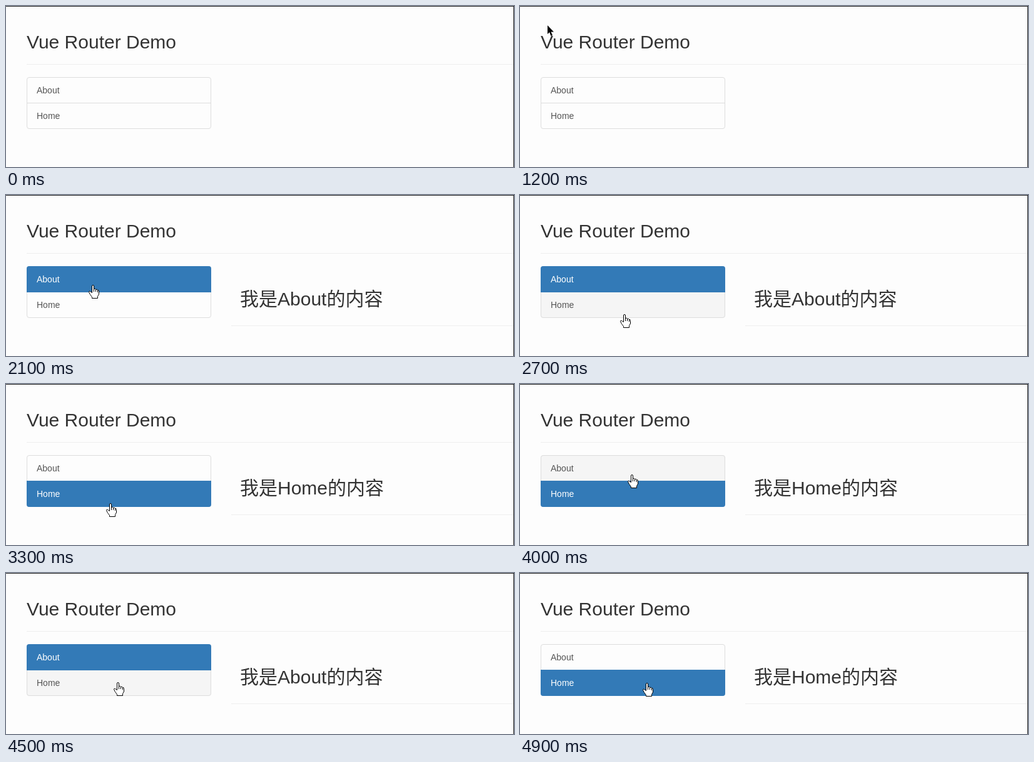
Animation of 812 by 258 pixels, one loop 5000 ms. Source, as an HTML page with a canvas:

```html
<!DOCTYPE html>
<html lang="zh-CN">
<head>
<meta charset="utf-8">
<title>Vue Router Demo</title>
<style>
  html, body { margin: 0; width: 100%; height: 100%; overflow: hidden; background: #fdfdfd; }
  canvas { display: block; }
</style>
</head>
<body>
<canvas id="stage" width="812" height="258"></canvas>
<script>
const ctx = document.getElementById('stage').getContext('2d');
const LOOP = 5000;
const STEP = 100;
const FAMILY = '"Liberation Sans", Arial, "Noto Sans CJK SC", "Noto Sans CJK", sans-serif';
const PAGE = '#fdfdfd';
const EDGE = '#222';
const INK = '#333';
const LINK = '#555';
const BORDER = '#ddd';
const RULE = '#eee';
const HOVER = '#f5f5f5';
const ACTIVE = '#337ab7';

const LIST = { x: 33, y: 114, w: 295, h: 83 };
const ITEMS = [
  { label: 'About', y: 114 },
  { label: 'Home', y: 155 }
];

// Pointer hot spot: [time, x, y]
const POINTER = [
  [1200, 44, 31], [1300, 74, 68], [1400, 104, 106], [1700, 138, 144],
  [2400, 138, 144], [2700, 166, 191],
  [3600, 166, 191], [4000, 178, 145],
  [4200, 178, 145], [4500, 178, 175],
  [4700, 178, 175], [4900, 202, 176]
];

// Selected item: [time, index]
const CLICKS = [[0, -1], [2100, 0], [3300, 1], [4100, 0], [4800, 1]];

const HAND = new Path2D(
  'M5.5 12.5V2Q5.5 .5 7 .5T8.5 2V6.5Q11 5.5 11.5 7.5Q14 6.5 14.5 8.5' +
  'Q16.5 8 16.5 10.5V15L14.5 18.5V21.5H5.5V19.5L2.5 15.5L.5 11.5' +
  'Q.5 9.5 2.5 10.5Z');
const KNUCKLES = new Path2D('M8.5 6V11M11.5 7.5V11M14.5 8.5V12');
const ARROW = new Path2D('M0 0V14L3 11L5.5 17L8 16L5.5 10.5H10Z');

function pointerAt(t) {
  if (t < POINTER[0][0]) return null;
  let i = POINTER.length - 1;
  while (POINTER[i][0] > t) i--;
  const [t0, x0, y0] = POINTER[i];
  const [t1, x1, y1] = POINTER[i + 1] || [t0 + 1, x0, y0];
  const p = Math.min(1, (t - t0) / (t1 - t0));
  return { x: Math.round(x0 + (x1 - x0) * p), y: Math.round(y0 + (y1 - y0) * p) };
}

function hoveredItem(p) {
  if (!p || p.x < LIST.x || p.x >= LIST.x + LIST.w) return -1;
  return ITEMS.findIndex(item => p.y >= item.y && p.y < item.y + 42);
}

function rect(color, x, y, w, h) {
  ctx.fillStyle = color;
  ctx.fillRect(x, y, w, h);
}

function text(str, x, y, size, color) {
  ctx.font = `${size}px ${FAMILY}`;
  ctx.fillStyle = color;
  ctx.fillText(str, x, y);
}

function fillItem(i, color) {
  ctx.fillStyle = color;
  ctx.beginPath();
  ctx.roundRect(LIST.x, ITEMS[i].y, LIST.w, 42, i ? [0, 0, 4, 4] : [4, 4, 0, 0]);
  ctx.fill();
}

function drawList(active, hovered) {
  if (hovered >= 0) fillItem(hovered, HOVER);

  ctx.strokeStyle = BORDER;
  ctx.lineWidth = 1;
  ctx.beginPath();
  ctx.roundRect(LIST.x + 0.5, LIST.y + 0.5, LIST.w - 1, LIST.h - 1, 3.5);
  ctx.stroke();
  rect(BORDER, LIST.x, 155, LIST.w, 1);

  if (active >= 0) fillItem(active, ACTIVE);
  ITEMS.forEach((item, i) =>
    text(item.label, 49, item.y + 26, 14, i === active ? '#fff' : LINK));
}

function drawPointer(p, isHand) {
  ctx.save();
  ctx.lineWidth = 1;
  if (isHand) {
    ctx.translate(p.x - 6, p.y);
    ctx.fillStyle = '#fff';
    ctx.strokeStyle = '#000';
    ctx.fill(HAND);
    ctx.stroke(HAND);
    ctx.stroke(KNUCKLES);
  } else {
    ctx.translate(p.x, p.y);
    ctx.fillStyle = '#000';
    ctx.fill(ARROW);
  }
  ctx.restore();
}

function draw(t) {
  const active = CLICKS.filter(c => c[0] <= t).pop()[1];
  const pointer = pointerAt(t);
  const hovered = hoveredItem(pointer);

  rect(PAGE, 0, 0, 812, 258);
  text('Vue Router Demo', 33, 68, 30, INK);
  rect(RULE, 33, 93, 778, 1);
  drawList(active, hovered);
  if (active >= 0) {
    text(`我是${ITEMS[active].label}的内容`, 374, 177, 30, INK);
    rect(RULE, 360, 209, 451, 1);
  }
  rect(EDGE, 0, 0, 812, 1);
  rect(EDGE, 811, 0, 1, 258);
  if (pointer) drawPointer(pointer, hovered >= 0);
}

const start = performance.now();
function tick() {
  const t = (performance.now() - start) % LOOP;
  draw(Math.floor(t / STEP) * STEP);
  requestAnimationFrame(tick);
}
tick();
</script>
</body>
</html>
```
